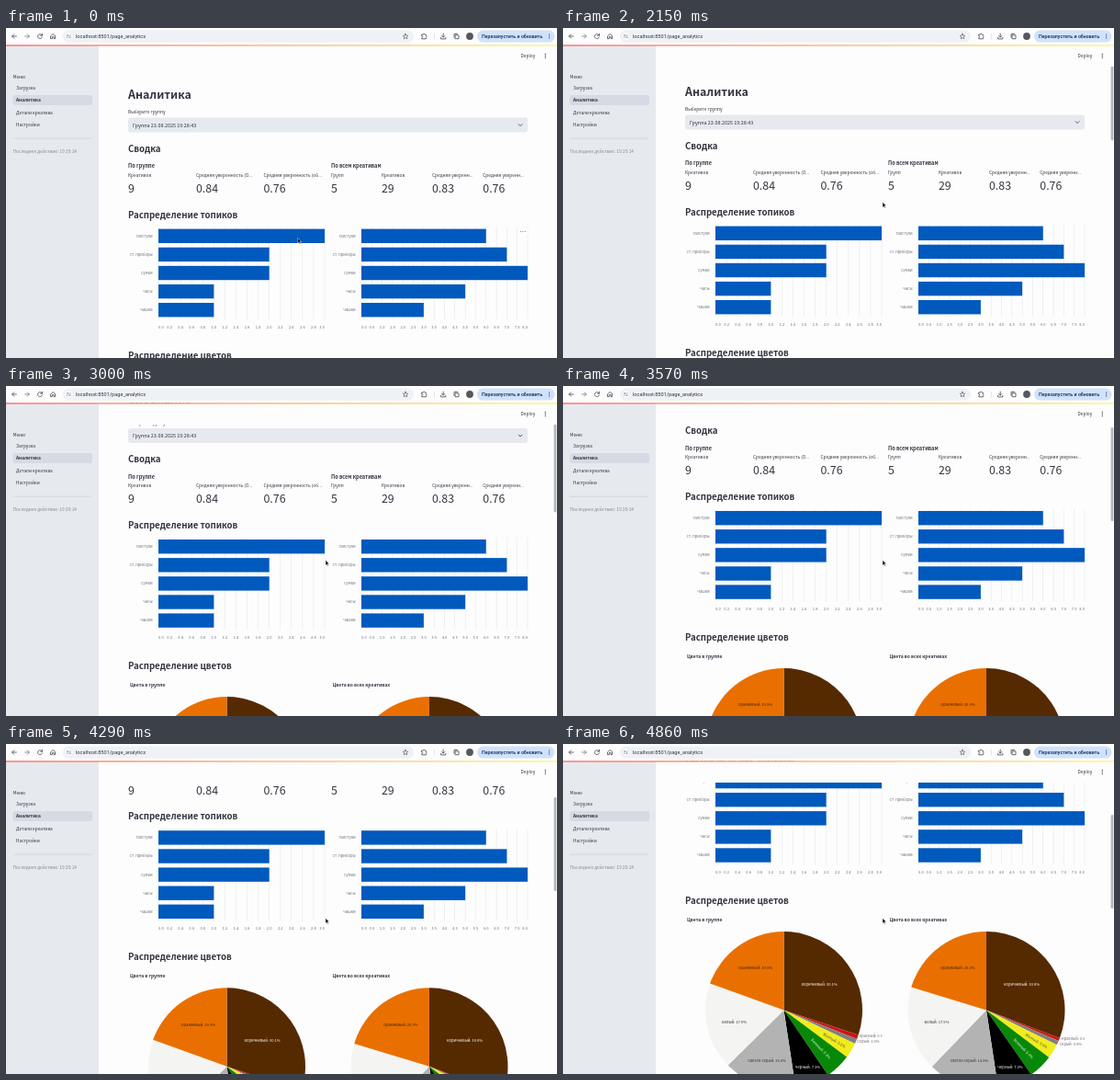
Animation of 600 by 359 pixels, one loop 5000 ms. Source, as an HTML page:

```html
<!DOCTYPE html>
<html lang="ru">
<head>
<meta charset="utf-8">
<title>Аналитика</title>
<style>
html, body { margin: 0; width: 100%; height: 100%; overflow: hidden; background: #fdfdfd; }
svg { display: block; }
text { font-family: "Noto Sans CJK JP", "Noto Sans CJK SC", "Noto Sans", sans-serif; fill: #31333f; white-space: pre; }
text.ui { font-family: Roboto, sans-serif; }
.line { fill: none; stroke: #44474c; stroke-width: .8; stroke-linecap: round; stroke-linejoin: round; }
</style>
</head>
<body>
<svg id="stage" width="600" height="359" viewBox="0 0 600 359"></svg>
<script>
const LOOP = 5000, STEP = LOOP / 35;
const INK = '#31333f', BLUE = '#0059bd', PANEL = '#e6e9ee';

function add(parent, tag, attrs, content) {
  const node = document.createElementNS('http://www.w3.org/2000/svg', tag);
  for (const key in attrs) node.setAttribute(key, attrs[key]);
  if (content) node.textContent = content;
  parent.append(node);
  return node;
}
const rect = (p, x, y, width, height, fill, rx = 0) => add(p, 'rect', { x, y, width, height, fill, rx });
const circle = (p, cx, cy, r, fill) => add(p, 'circle', { cx, cy, r, fill });
const line = (p, d, extra) => add(p, 'path', { class: 'line', d, ...extra });
const label = (p, x, y, size, str, extra) => add(p, 'text', { x, y, 'font-size': size, ...extra }, str);
const bold = { 'font-weight': 700 };

const stage = document.getElementById('stage');
rect(stage, 0, 0, 600, 359, '#fdfdfd');
const page = add(stage, 'g', {});
const thumb = rect(stage, 596.6, 19.5, 2.8, 102, '#b4b6ba', 1.4);

// Page heading, select box and metrics
label(page, 133, 76.8, 12.35, 'Аналитика', bold);
label(page, 133, 93.3, 4.8, 'Выберите группу');
rect(page, 133, 97.5, 435, 16, PANEL, 3);
label(page, 138, 107.6, 5.45, 'Группа 23.08.2025 19:28:43');
line(page, 'M558.2 104.7l1.9 1.9l1.9-1.9', { style: 'stroke:' + INK });
label(page, 133, 135, 9.6, 'Сводка', bold);
label(page, 133, 152.2, 5.6, 'По группе', bold);
label(page, 354, 152.2, 5.6, 'По всем креативам', bold);
[
  [133, 'Креативов', '9'],
  [207, 'Средняя уверенность (О...', '0.84'],
  [280.5, 'Средняя уверенность (об...', '0.76'],
  [354, 'Групп', '5'],
  [409, 'Креативов', '29'],
  [464, 'Средняя уверенн...', '0.83'],
  [519.3, 'Средняя уверенн...', '0.76']
].forEach(([x, name, value]) => {
  label(page, x, 162, 4.8, name);
  label(page, x, 179.1, 12.35, value);
});

// Bar charts
label(page, 133, 206.8, 9.6, 'Распределение топиков', bold);
const TOPICS = ['Галстуки', 'Ст. приборы', 'Сумки', 'Часы', 'Чашки'];

function barChart(x, max, tick, values) {
  const width = 181, count = Math.round(max / tick);
  for (let i = 0; i <= count; i++) {
    const gx = x + width * i / count;
    rect(page, gx - .25, 216.4, .5, 100.5, '#dfe2e7');
    const anchor = i === 0 ? 'start' : i === count ? 'end' : 'middle';
    label(page, gx, 326.5, 4.1, (i * tick).toFixed(1), { 'text-anchor': anchor, style: 'fill:#6c6f78' });
  }
  values.forEach((v, i) => {
    const y = 226.3 + i * 20.1;
    rect(page, x, y - 7.7, width * v / max, 15.4, BLUE);
    label(page, x - 6.5, y + 1.4, 4.1, TOPICS[i], { 'text-anchor': 'end', style: 'fill:#6c6f78' });
  });
}
barChart(166, 3, .2, [3, 2, 2, 1, 1]);
barChart(387, 8, .5, [6, 7, 8, 5, 3]);

const chartMenu = add(page, 'g', {});
rect(chartMenu, 557.5, 217.5, 10.5, 7.5, '#fdfdfd', 1);
for (const x of [560.4, 562.8, 565.2]) circle(chartMenu, x, 221.3, .65, '#85888e');

// Pie charts: name, fill, text colour, label offset from the centre
label(page, 133, 359.5, 9.6, 'Распределение цветов', bold);
const SLICES = [
  ['Коричневый', '#552a00', '#fff', 38.5, -28],
  ['Красный', '#d01414', '#6b6d78', 82, 28.5, 'out'],
  ['Серый', '#808080', '#6b6d78', 79.5, 34.5, 'out'],
  ['Желтый', '#f1ec1c', '#444', 64, 0, 'turn'],
  ['Зеленый', '#088808', '#fff', 58, 0, 'turn'],
  ['Черный', '#000', '#fff', 26, 62.5],
  ['Светло-серый', '#b3b3b3', '#333', -18.5, 55],
  ['Белый', '#f4f4f2', '#333', -54, 13],
  ['Оранжевый', '#e97000', '#432400', -31.2, -45.5]
];

function pie(left, title, shares, drop) {
  const cx = left + 107.5, cy = 475.2, r = 85.5;
  label(page, left + 2, 378.4, 5, title, bold);
  const box = add(page, 'svg', {
    x: left, y: 380, width: 214.5, height: 200, viewBox: `${left} 380 214.5 200`
  });
  const texts = [];
  let from = 0;
  SLICES.forEach(([name, fill, ink, dx, dy, mode], i) => {
    const to = from + shares[i] / 100 * 2 * Math.PI;
    const at = a => `${cx + r * Math.sin(a)} ${cy - r * Math.cos(a)}`;
    add(box, 'path', { fill, d: `M${cx} ${cy}L${at(from)}A${r} ${r} 0 0 1 ${at(to)}Z` });
    const turn = mode === 'turn' ? (from + to) * 90 / Math.PI - 90 : 0;
    const shift = mode === 'out' ? drop : 0;
    texts.push(() => label(box, dx, dy + shift + 1.4, 4.1, `${name}: ${shares[i].toFixed(1)}%`, {
      'text-anchor': mode === 'out' ? 'start' : 'middle',
      transform: `translate(${cx} ${cy}) rotate(${turn})`,
      style: 'fill:' + ink
    }));
    from = to;
  });
  texts.forEach(draw => draw());
}
pie(133, 'Цвета в группе', [30.1, .9, 1, 3.2, 5.3, 7.1, 15, 17.9, 19.5], 0);
pie(353.5, 'Цвета во всех креативах', [30.8, .6, .9, 3, 5, 7.3, 14.6, 17.5, 20.3], 3);

// Page header
rect(stage, 101, 19, 499, 23, '#fdfdfd');
label(stage, 560.5, 32.3, 4.8, 'Deploy');
for (const y of [28.4, 30.5, 32.6]) circle(stage, 587.3, y, .65, INK);

// Sidebar
rect(stage, 0, 19, 101, 340, PANEL);
label(stage, 7.5, 54.8, 4.8, 'Меню', { 'font-weight': 500 });
rect(stage, 7.5, 73, 86.5, 11, '#d5dae4', 2.5);
['Загрузка', 'Аналитика', 'Детали креатива', 'Настройки'].forEach((name, i) =>
  label(stage, 11, 66.9 + i * 13.45, 4.8, name, i === 1 ? bold : {}));
rect(stage, 7.5, 119.8, 85.5, .6, '#c6cad2');
label(stage, 7.5, 135.6, 4.8, 'Последнее действие: 19:29:14', { style: 'fill:#858993' });

// Browser toolbar
rect(stage, 0, 0, 600, 18.6, '#fdfdfd');
const fade = add(stage, 'linearGradient', { id: 'fade' });
add(fade, 'stop', { offset: 0, 'stop-color': '#ff4b4b' });
add(fade, 'stop', { offset: 1, 'stop-color': '#fff35c' });
rect(stage, 0, 18.4, 600, 1.1, 'url(#fade)');

line(stage, 'M11.4 9H6.6M8.8 6.8L6.6 9l2.2 2.2');
line(stage, 'M20.6 9h4.8M23.2 6.8L25.4 9l-2.2 2.2', { style: 'stroke:#777a80' });
line(stage, 'M39.3 8A2.5 2.5 0 1 0 39.4 10M39.5 6.3V8.2H37.6');
line(stage, 'M48.8 8.6L51.2 6.5L53.6 8.6V11.6H52.1V9.6H50.3V11.6H48.8Z');
rect(stage, 62, 2.6, 382, 13, '#eef1f5', 6.5);
circle(stage, 68.3, 9, 3.6, '#fdfdfd');
line(stage, 'M66.6 8H68M69.9 8h.2M66.5 10.1h.2M68.7 10.1h1.4', { 'stroke-width': .6 });
label(stage, 76, 11, 5.6, 'localhost:8501/page_analytics', { class: 'ui' });
line(stage, 'M435 6.2l.8 1.9l2 .2l-1.5 1.4l.4 2l-1.7-1l-1.7 1l.4-2l-1.5-1.4l2-.2Z', { style: 'stroke-width:.6' });
line(stage, 'M452.8 7.2H454.2A1 1 0 0 1 456.2 7.2H457.4V8.6A1 1 0 0 1 457.4 10.4V11.8H452.8V10.4A.9.9 0 0 0 452.8 8.6Z');
rect(stage, 466, 6, .6, 6.4, '#d0d6e0');
line(stage, 'M476.2 6.1V9.9M474.6 8.5L476.2 10.1L477.8 8.5M473.6 10.4V11.9H478.8V10.4');
line(stage, 'M488 10.2V6.4H491.6M489.4 7.9H493V11.7H489.4Z');
circle(stage, 505, 9, 3.9, '#55585d');
rect(stage, 513, 2.6, 84.5, 13, '#d0e2fb', 6.5);
label(stage, 518, 11, 5.25, 'Перезапустить и обновить', { class: 'ui', 'font-weight': 500, style: 'fill:#0d2b57' });
for (const y of [7, 9, 11]) circle(stage, 591.6, y, .6, '#0d2b57');

// Mouse pointer
const pointer = add(stage, 'path', {
  d: 'M0 0V5.7L1.3 4.5L2.2 6.5L3.1 6.1L2.2 4.1H4Z',
  fill: '#000', stroke: '#fff', 'stroke-width': .45
});

// Motion tables: time in ms, then values
const SCROLL = [[2000, 0], [2143, 3], [3000, 51.6], [3571, 82.6], [4286, 124.4], [4857, 185.7]];
const POINTER = [[0, 317.7, 228.5], [571, 321, 161], [1143, 321, 161], [2000, 348, 189.5]];

function sample(table, t) {
  let i = 0;
  while (i < table.length - 1 && table[i + 1][0] <= t) i++;
  const a = table[i], b = table[i + 1] || a;
  const k = b === a ? 0 : Math.max(0, (t - a[0]) / (b[0] - a[0]));
  return a.slice(1).map((v, n) => v + (b[n + 1] - v) * k);
}

function render(ms) {
  const t = Math.floor((ms % LOOP + 8) / STEP) % 35 * STEP;
  const [scroll] = sample(SCROLL, t);
  const [x, y] = sample(POINTER, t);
  page.setAttribute('transform', `translate(0 ${-scroll})`);
  thumb.setAttribute('y', 19.5 + scroll * .31);
  thumb.style.display = scroll > 0 ? '' : 'none';
  chartMenu.style.display = t < STEP ? '' : 'none';
  pointer.setAttribute('transform', `translate(${x} ${y})`);
}

const start = performance.now();
function tick() {
  render(performance.now() - start);
  requestAnimationFrame(tick);
}
tick();
</script>
</body>
</html>
```
